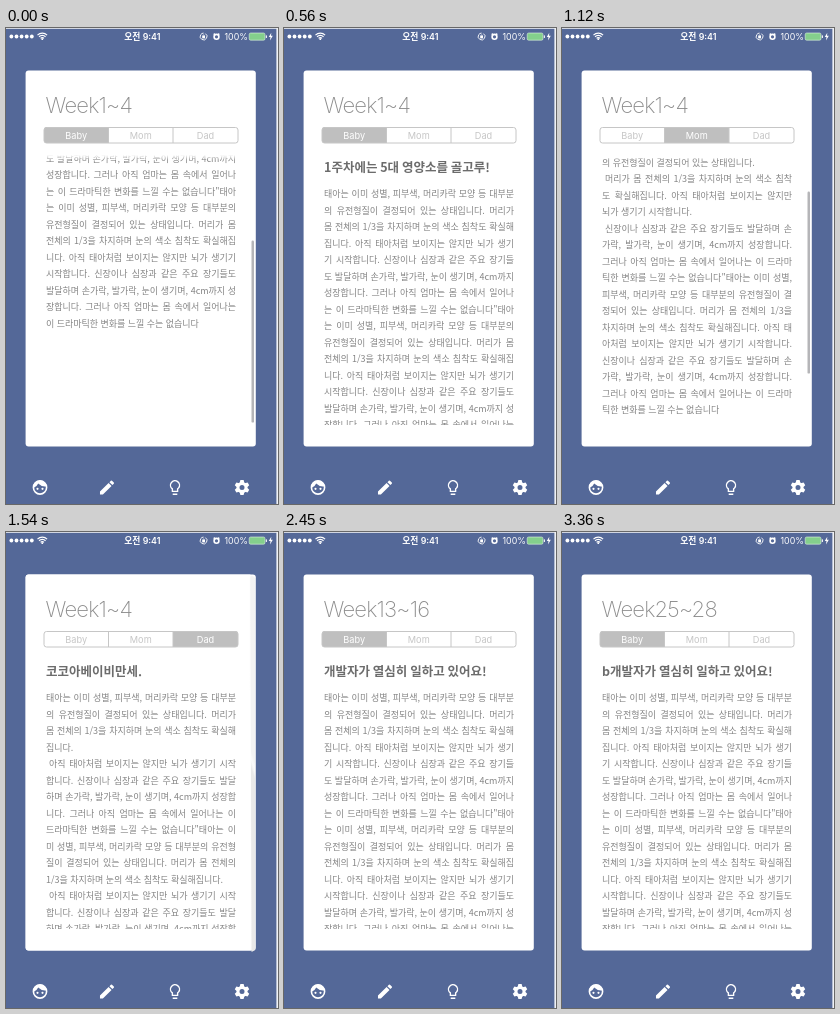
An HTML page with a canvas for the animation above (3.78 s loop, 272 by 476 pixels).

```html
<!DOCTYPE html>
<html lang="ko">
<head>
<meta charset="utf-8">
<title>Weekly cards</title>
<style>
html, body { margin: 0; width: 100%; height: 100%; overflow: hidden; background: #546898; }
canvas { display: block; width: 272px; height: 476px; }
</style>
</head>
<body>
<canvas id="stage"></canvas>
<script>
const W = 272, H = 476, LOOP = 3780, TICK = 70;
const BLUE = '#546898';
const LATIN = 'Inter, "Noto Sans CJK KR", sans-serif';
const KOREAN = '"Noto Sans CJK KR", "Noto Sans CJK", sans-serif';
const canvas = document.getElementById('stage');
const ctx = canvas.getContext('2d');
const dpr = window.devicePixelRatio || 1;
canvas.width = W * dpr;
canvas.height = H * dpr;

// A trailing "|" ends a paragraph; every other line is justified.
const babyText = `태아는 이미 성별, 피부색, 머리카락 모양 등 대부분
의 유전형질이 결정되어 있는 상태입니다. 머리가
몸 전체의 1/3을 차지하며 눈의 색소 침착도 확실해
집니다. 아직 태아처럼 보이지는 않지만 뇌가 생기
기 시작합니다. 신장이나 심장과 같은 주요 장기들
도 발달하며 손가락, 발가락, 눈이 생기며, 4cm까지
성장합니다. 그러나 아직 엄마는 몸 속에서 일어나
는 이 드라마틱한 변화를 느낄 수는 없습니다"태아
는 이미 성별, 피부색, 머리카락 모양 등 대부분의
유전형질이 결정되어 있는 상태입니다. 머리가 몸
전체의 1/3을 차지하며 눈의 색소 침착도 확실해집
니다. 아직 태아처럼 보이지는 않지만 뇌가 생기기
시작합니다. 신장이나 심장과 같은 주요 장기들도
발달하며 손가락, 발가락, 눈이 생기며, 4cm까지 성
장합니다. 그러나 아직 엄마는 몸 속에서 일어나는
이 드라마틱한 변화를 느낄 수는 없습니다|`;

const momText = `태아는 이미 성별, 피부색, 머리카락 모양 등 대부분
의 유전형질이 결정되어 있는 상태입니다.|
 머리가 몸 전체의 1/3을 차지하며 눈의 색소 침착
도 확실해집니다. 아직 태아처럼 보이지는 않지만
뇌가 생기기 시작합니다.|
 신장이나 심장과 같은 주요 장기들도 발달하며 손
가락, 발가락, 눈이 생기며, 4cm까지 성장합니다.
그러나 아직 엄마는 몸 속에서 일어나는 이 드라마
틱한 변화를 느낄 수는 없습니다"태아는 이미 성별,
피부색, 머리카락 모양 등 대부분의 유전형질이 결
정되어 있는 상태입니다. 머리가 몸 전체의 1/3을
차지하며 눈의 색소 침착도 확실해집니다. 아직 태
아처럼 보이지는 않지만 뇌가 생기기 시작합니다.
신장이나 심장과 같은 주요 장기들도 발달하며 손
가락, 발가락, 눈이 생기며, 4cm까지 성장합니다.
그러나 아직 엄마는 몸 속에서 일어나는 이 드라마
틱한 변화를 느낄 수는 없습니다|`;

const dadText = `태아는 이미 성별, 피부색, 머리카락 모양 등 대부분
의 유전형질이 결정되어 있는 상태입니다. 머리가
몸 전체의 1/3을 차지하며 눈의 색소 침착도 확실해
집니다.|
 아직 태아처럼 보이지는 않지만 뇌가 생기기 시작
합니다. 신장이나 심장과 같은 주요 장기들도 발달
하며 손가락, 발가락, 눈이 생기며, 4cm까지 성장합
니다. 그러나 아직 엄마는 몸 속에서 일어나는 이
드라마틱한 변화를 느낄 수는 없습니다"태아는 이
미 성별, 피부색, 머리카락 모양 등 대부분의 유전형
질이 결정되어 있는 상태입니다. 머리가 몸 전체의
1/3을 차지하며 눈의 색소 침착도 확실해집니다.|
 아직 태아처럼 보이지는 않지만 뇌가 생기기 시작
합니다. 신장이나 심장과 같은 주요 장기들도 발달
하며 손가락, 발가락, 눈이 생기며, 4cm까지 성장합`;

const appText = `앱은 세상을 바꾸고 즐거움을 더합니다.|
삶은 풍요로워지고 누구나 참여하여 이용하도록 하
에 없던 새로운 방식으로 앱들을 개발하는 훌륭한
 이에 따라 Box Porch를 만든 Ornel은 이 원칙을
억 명 이상의 사용자에게 매일 앱의 내용을 업데이트
감 넘치는 환경으로|
개발자일 수도 있고 팀이라면 또한 더욱 효율적으로
구성된 팀일 수도 있는데 새로 추가되었습니다. 다
Ornel은 바로 여러분이 만드는 비즈니스, 디자인 및
고 계신 것을 기쁘게 여기며 더욱 명확하게 정리된
속하게 통과할 수 있|
지침을 이해하는 데 도움이 되겠습니다.|`;

const lateText = `태아는 이미 성별, 피부색, 머리카락 모양 등 대부분
의 유전형질이 결정되어 있는 상태입니다.|
 머리가 몸 전체의 1/3을 차지하며 눈의 색소 침착
도 확실해집니다. 아직 태아처럼 보이지는 않지만
뇌가 생기기 시작합니다. 신장이나 심장과 같은 주
요 장기들도 발달하며 손가락, 발가락, 눈이 생기며,
4cm까지 성장합니다. 그러나 아직 엄마는 몸 속에
서 일어나는 이 드라마틱한 변화를 느낄 수는 없습
니다"태아는 이미 성별, 피부색, 머리카락 모양 등
대부분의 유전형질이 결정되어 있는 상태입니다.
머리가 몸 전체의 1/3을 차지하며 눈의 색소 침착도
확실해집니다. 아직 태아처럼 보이지는 않지만 뇌
가 생기기 시작합니다. 신장이나 심장과 같은 주요
장기들도 발달하며 손가락, 발가락, 눈이 생기며,
4cm까지 성장합니다. 그러나 아직 엄마는 몸 속에`;

const page = (week, tab, head, text) => ({ week, tab, head, lines: text.split('\n') });
const baby = page('Week1~4', 0, '1주차에는 5대 영양소를 골고루!', babyText);
const mom = page('Week1~4', 1, '엄마를 위한 영양소 정보!', momText);
const dad = page('Week1~4', 2, '코코아베이비만세.', dadText);
const weeks = [
  page('Week5~8', 0, '개발자가 열심히 일해요', appText),
  page('Week9~12', 0, '개발자가 열심히 일해요', appText),
  page('Week13~16', 0, '개발자가 열심히 일하고 있어요!', babyText),
  page('Week17~20', 0, '8주 동안 전부 수고하셨습니다!', lateText),
  page('Week21~24', 0, '개발자가 열심히 일하고 있어요!', babyText),
  page('Week25~28', 0, 'b개발자가 열심히 일하고 있어요!', babyText)
];
// Page turns: start and duration in ms.
const turns = [[1538, 137], [1960, 137], [2310, 137], [2658, 137], [2870, 86], [3220, 137]];

const clamp = v => Math.max(0, Math.min(1, v));
const easeInOut = u => u * u * (3 - 2 * u);

function text(str, x, y, font, color, align = 'left', spacing = 0) {
  ctx.font = font;
  ctx.fillStyle = color;
  ctx.textAlign = align;
  ctx.letterSpacing = spacing + 'px';
  ctx.fillText(str, x, y);
}

function box(x, y, w, h, r, color) {
  ctx.fillStyle = color;
  ctx.beginPath();
  ctx.roundRect(x, y, w, h, r);
  ctx.fill();
}

function disc(x, y, r) {
  ctx.beginPath();
  ctx.arc(x, y, r, 0, 7);
  ctx.fill();
}

function arc(x, y, r, a, b) {
  ctx.beginPath();
  ctx.arc(x, y, r, a, b);
  ctx.stroke();
}

function poly(points) {
  ctx.beginPath();
  points.forEach(([x, y]) => ctx.lineTo(x, y));
  ctx.closePath();
}

function bodyLine(line, y) {
  const ends = line.endsWith('|');
  const words = line.replace('|', '').trim().split(' ');
  ctx.font = '300 9px ' + KOREAN;
  ctx.letterSpacing = '0px';
  ctx.textAlign = 'left';
  ctx.fillStyle = '#858585';
  const widths = words.map(w => ctx.measureText(w).width);
  let x = line[0] === ' ' ? 43 : 40;
  const total = widths.reduce((a, b) => a + b, 0);
  const gap = ends ? 2.4 : (230 - x - total) / (words.length - 1);
  words.forEach((w, i) => {
    ctx.fillText(w, x, y);
    x += widths[i] + gap;
  });
}

function tabs(active) {
  const edges = [38, 102.5, 167, 232];
  ctx.save();
  ctx.beginPath();
  ctx.roundRect(38, 99, 194, 16, 2.5);
  ctx.clip();
  ctx.fillStyle = '#bfbfbf';
  ctx.fillRect(edges[active], 99, edges[active + 1] - edges[active], 16);
  ctx.restore();
  ctx.strokeStyle = '#c6c6c6';
  ctx.lineWidth = 1;
  ctx.beginPath();
  ctx.roundRect(38, 99.5, 194, 15.5, 2.5);
  [102.5, 167].forEach(x => { ctx.moveTo(x, 99.5); ctx.lineTo(x, 115); });
  ctx.stroke();
  ['Baby', 'Mom', 'Dad'].forEach((name, i) =>
    text(name, (edges[i] + edges[i + 1]) / 2, 110.5, '400 9.2px ' + LATIN, i === active ? '#fff' : '#c6c6c6', 'center'));
}

function card(p, scroll = 0, bar = 0) {
  box(19.6, 42.6, 230.2, 375.9, 3, '#fff');
  text(p.week, 39.5, 84.8, '200 22px ' + LATIN, '#8c8c8c', 'left', -0.8);
  tabs(p.tab);
  ctx.save();
  ctx.beginPath();
  ctx.rect(36, 127, 200, 270);
  ctx.clip();
  text(p.head, 40, 143.8 - scroll, '700 12.5px ' + KOREAN, '#6c6c6c');
  p.lines.forEach((line, i) => bodyLine(line, 169.3 + i * 16.5 - scroll));
  const fade = ctx.createLinearGradient(0, 127, 0, 132);
  fade.addColorStop(0, '#fff');
  fade.addColorStop(1, '#fff0');
  ctx.fillStyle = fade;
  ctx.fillRect(36, 127, 200, 5);
  ctx.restore();
  if (bar > 0) {
    ctx.globalAlpha = bar;
    box(245.5, 130 + Math.max(0, scroll) * 0.7, 2.5, 182 + Math.min(0, scroll), 1.2, '#b5b5b8');
    ctx.globalAlpha = 1;
  }
}

function turn(from, to, p) {
  card(to);
  const c = 250 - 230 * p, k = Math.min(1, p * 6);
  const lt = c - 26 * k, lb = c - 12 * k, rt = c + 24 * k, rb = c + 29 * k;
  ctx.save();
  poly([[0, 30], [lt, 30], [lb, 430], [0, 430]]);
  ctx.clip();
  card(from);
  ctx.restore();

  // The slanted gradient follows the tilt of the rolled sheet.
  const roll = ctx.createLinearGradient(lt, 233, rb, 231.5);
  ['#e9e9e9', '#f3f3f3', '#fafafa', '#f8f8f8', '#f3f3f3'].forEach((color, i) => roll.addColorStop(i / 4, color));
  ctx.save();
  ctx.shadowColor = `rgba(0,0,0,${0.55 * k})`;
  ctx.shadowBlur = 17 * k * dpr;
  ctx.shadowOffsetX = 2 * k * dpr;
  ctx.fillStyle = roll;
  ctx.beginPath();
  ctx.moveTo(lt, 44.5);
  ctx.quadraticCurveTo(c, 43 - k, rt, 46);
  ctx.lineTo(rb, 418);
  ctx.quadraticCurveTo((lb + rb) / 2, 419 + k, lb, 420);
  ctx.closePath();
  ctx.fill();
  ctx.restore();
}

function statusBar() {
  ctx.fillStyle = ctx.strokeStyle = '#fff';
  for (let i = 0; i < 5; i++) disc(5.4 + i * 5.1, 8.5, 1.9);
  ctx.lineWidth = 1.2;
  [2.4, 4.6, 6.8].forEach(r => arc(36.3, 12, r, -Math.PI * 0.75, -Math.PI * 0.25));
  disc(36.3, 11.2, 0.9);
  text('오전 9:41', 136.3, 11.8, '600 8.8px ' + LATIN, '#fff', 'center');

  ctx.lineWidth = 0.9;
  ctx.strokeStyle = '#fff';
  arc(197.6, 8.5, 3.4, -1, 4.7);
  ctx.fillRect(196.2, 8, 2.8, 2.4);
  arc(197.6, 8, 0.9, Math.PI, 0);
  ctx.lineWidth = 1.6;
  arc(210.5, 8.8, 2.4, 0, 7);
  disc(208.4, 6.2, 0.9);
  disc(212.6, 6.2, 0.9);
  text('100%', 218.5, 11.8, '400 8.8px ' + LATIN, '#fff');
  box(243.2, 5, 15.8, 7.2, 1.5, '#84cf8c');
  ctx.strokeStyle = '#dff0e2';
  ctx.lineWidth = 0.6;
  ctx.stroke();
  box(259.8, 7.3, 1.1, 2.8, 0.5, '#fff');
  poly([[265.3, 4.8], [262.8, 9], [264.5, 9], [264, 12.5], [266.8, 7.8], [265, 7.8]]);
  ctx.fill();
}

const pencil = new Path2D('M3 17.25V21h3.75L17.81 9.94l-3.75-3.75zM20.71 7.04a1 1 0 0 0 0-1.41l-2.34-2.34a1 1 0 0 0-1.41 0l-1.83 1.83 3.75 3.75z');

function at(x, y, s, draw) {
  ctx.save();
  ctx.translate(x, y);
  ctx.scale(s, s);
  ctx.fillStyle = ctx.strokeStyle = '#fff';
  draw();
  ctx.restore();
}

function toolbar() {
  at(34, 459.5, 1, () => {
    ctx.lineWidth = 1.6;
    arc(0, 0, 6.6, 0, 7);
    ctx.beginPath();
    ctx.moveTo(-6.6, 0.5);
    ctx.quadraticCurveTo(-3, -1, -1.8, -4);
    ctx.quadraticCurveTo(1.5, -0.5, 6.6, -1.2);
    ctx.arc(0, 0, 7, -0.2, Math.PI, true);
    ctx.fill();
    disc(-2.5, 1.3, 1.1);
    disc(2.5, 1.3, 1.1);
  });
  at(101, 459.5, 0.78, () => {
    ctx.translate(-12, -12);
    ctx.fill(pencil);
  });
  at(169, 459.5, 1, () => {
    ctx.lineWidth = 1.4;
    ctx.beginPath();
    ctx.arc(0, -2.3, 4.5, 2.2, 0.94);
    ctx.lineTo(2.6, 3.9);
    ctx.lineTo(-2.6, 3.9);
    ctx.closePath();
    ctx.stroke();
    ctx.fillRect(-2.3, 6, 4.6, 1.5);
  });
  at(236, 459.5, 1, () => {
    ctx.lineWidth = 3;
    arc(0, 0, 4, 0, 7);
    for (let i = 0; i < 6; i++) {
      ctx.rotate(Math.PI / 3);
      poly([[-2.4, -4.5], [-1.6, -7.4], [1.6, -7.4], [2.4, -4.5]]);
      ctx.fill();
    }
  });
}

function babyScroll(t) {
  return t < 350
    ? 118 - 144 * easeInOut(t / 350)
    : -26 * Math.pow(1 - clamp((t - 350) / 210), 2);
}

function cards(t) {
  if (t < 630) return card(baby, babyScroll(t), clamp((560 - t) / 140));
  if (t < 1330) {
    const u = clamp((t - 840) / 420);
    return card(mom, 64 * Math.sin(Math.PI * u) ** 2, u > 0 ? clamp((1260 - t) / 140) : 0);
  }
  let current = dad;
  for (let i = 0; i < turns.length; i++) {
    const p = (t - turns[i][0]) / turns[i][1];
    if (p <= 0) break;
    if (p < 1) return turn(current, weeks[i], p);
    current = weeks[i];
  }
  card(current);
}

function render(now) {
  const t = Math.floor((now % LOOP) / TICK) * TICK;
  ctx.setTransform(dpr, 0, 0, dpr, 0, 0);
  ctx.fillStyle = BLUE;
  ctx.fillRect(0, 0, W, H);
  cards(t);
  statusBar();
  toolbar();
  ctx.fillStyle = '#f0f2f6';
  ctx.fillRect(270.4, 0, 1.6, H);
  ctx.fillRect(0, 0, W, 0.8);
}

function loop() {
  render(performance.now());
  requestAnimationFrame(loop);
}
loop();
</script>
</body>
</html>
```
